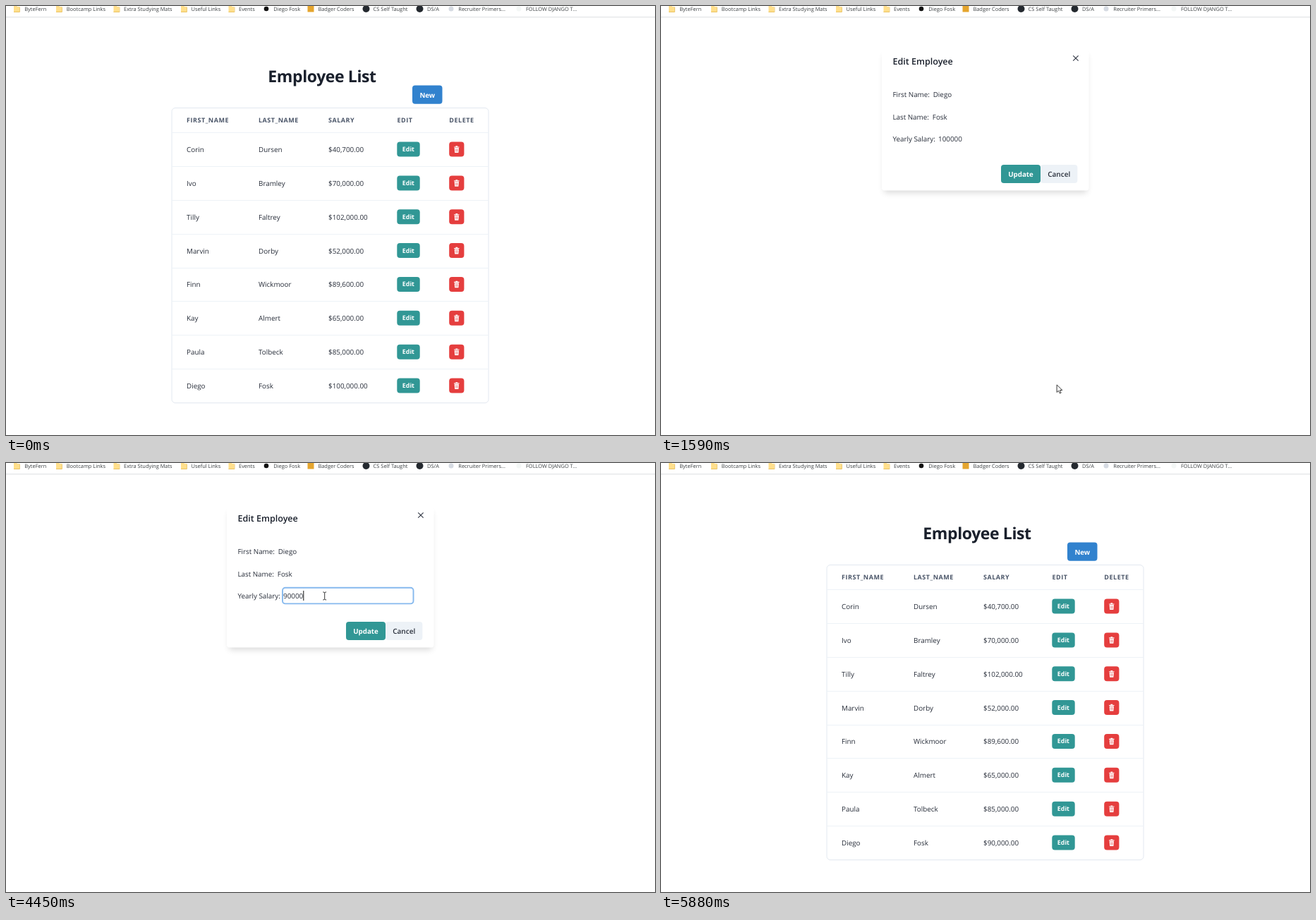
An HTML page for the animation above (6480 ms loop, 920x608 px).

```html
<!DOCTYPE html>
<html lang="en">
<head>
<meta charset="utf-8">
<title>Employee List</title>
<style>
  html, body { margin: 0; width: 100%; height: 100%; overflow: hidden; background: #fff; }
  svg { display: block; width: 920px; height: 608px; }
  text { font: 9.85px "Open Sans", "Noto Sans", sans-serif; fill: #272d39; white-space: pre; text-rendering: geometricPrecision; }
  .bookmark { font-size: 7.45px; fill: #3c4043; }
  .title { font-size: 23px; font-weight: 700; letter-spacing: -.4px; text-anchor: middle; fill: #1a202c; }
  .head { font-size: 9px; font-weight: 700; letter-spacing: .52px; fill: #4a5568; }
  .button { font-size: 9.75px; font-weight: 700; text-anchor: middle; }
  .plain { font-size: 10px; font-weight: 600; }
  .small { font-size: 8.9px; font-weight: 700; text-anchor: middle; }
  .heading { font-size: 12.55px; font-weight: 600; fill: #1a202c; }
  .light { fill: #fff; }
  #modal { transform-origin: 460px 162px; }
  #shadow { filter: blur(4px); }
</style>
</head>
<body>
<svg id="stage" viewBox="0 0 920 608"></svg>
<script>
const LOOP = 6480;
const TEAL = [49, 151, 149], TEAL_DARK = [43, 118, 118];
const DIGIT = 5.66;

const text = (x, y, str, cls = "", id = "") =>
  `<text x="${x}" y="${y}" class="${cls}" id="${id}">${str}</text>`;
const box = (x, y, w, h, fill, r = 4, more = "") =>
  `<rect x="${x}" y="${y}" width="${w}" height="${h}" rx="${r}" fill="${fill}" ${more}/>`;
const dot = (x, r, fill) => `<circle cx="${x}" cy="4" r="${r}" fill="${fill}"/>`;
const line = (d, stroke, width = 1) =>
  `<path d="${d}" fill="none" stroke="${stroke}" stroke-width="${width}"/>`;
const rgb = c => `rgb(${c.map(Math.round)})`;

// Browser bookmark bar
const folder = x =>
  `<path d="M${x}-1h4l1 2h3v8h-8z" fill="#ffdf8c"/>` + line(`M${x} 8.5h8.5v-7`, "#e6bd58", .8);
const bookmarks = [
  [26.3, "ByteFern", folder(11)],
  [85.8, "Bootcamp Links", folder(71)],
  [167, "Extra Studying Mats", folder(152.5)],
  [262.5, "Useful Links", folder(248)],
  [330, "Events", folder(315.5)],
  [379.3, "Diego Fosk", dot(369, 3.3, "#111")],
  [442.4, "Badger Coders", box(427.5, -.5, 9, 9, "#e5a52e", 0)],
  [520.6, "CS Self Taught", dot(510.5, 5, "#24292f")],
  [597, "DS/A", dot(586.5, 5, "#24292f")],
  [641.3, "Recruiter Primers...", dot(631, 3.5, "#d5dae2")],
  [737, "FOLLOW DJANGO T...", dot(727, 3.5, "#f4f7f6")],
];
const bar = bookmarks.map(([x, label, icon]) => icon + text(x, 6.8, label, "bookmark")).join("")
  + line("M0 15.8H920", "#dcdee1");

// Employee table
const people = [
  ["Corin", "Dursen", "$40,700.00"], ["Ivo", "Bramley", "$70,000.00"],
  ["Tilly", "Faltrey", "$102,000.00"], ["Marvin", "Dorby", "$52,000.00"],
  ["Finn", "Wickmoor", "$89,600.00"], ["Kay", "Almert", "$65,000.00"],
  ["Paula", "Tolbeck", "$85,000.00"], ["Diego", "Fosk", "$100,000.00"],
];
const columns = [[256, "FIRST_NAME"], [358, "LAST_NAME"], [457, "SALARY"], [554.5, "EDIT"], [628.3, "DELETE"]];

const trash = y => `<g transform="translate(638.8 ${y})">`
  + line("M-3.7-3.2H3.7M-1.4-4.3H1.4", "#fff", 1.1)
  + `<path d="M-3.1-2.1H3.1L2.6 4.8H-2.6Z" fill="#fff"/>`
  + line("M-1-.8V3.4M1-.8V3.4", "#e53e3e", .7) + `</g>`;

const row = ([first, last, salary], i) => {
  const y = 203.2 + i * 47.84, end = i === people.length - 1;
  return line(`M235 ${Math.round(y - 24) + .5}H684`, "#edf2f7")
    + text(256, y + 3.9, first) + text(358, y + 3.9, last)
    + text(457, y + 3.9, salary, "", end ? "salary" : "")
    + box(554.3, y - 10.6, 32.4, 21, rgb(TEAL), 4, end ? 'id="edit"' : "")
    + text(570.4, y + 2.9, "Edit", "small light")
    + box(628.2, y - 10.6, 21.2, 21, "#e53e3e") + trash(y);
};

const list = text(448, 107.6, "Employee List", "title")
  + box(576, 112.6, 42.5, 26.2, "#3182ce") + text(597.3, 129.8, "New", "button light")
  + box(235, 144.5, 449, 418, "#fff", 5, 'stroke="#e2e8f0"')
  + columns.map(([x, label]) => text(x, 165, label, "head")).join("")
  + people.map(row).join("");

// Edit dialog
const modal = box(316, 69, 288, 196, "#000", 4, 'id="shadow" opacity=".14"')
  + box(313, 61, 293.5, 200.5, "#fff")
  + text(328.4, 83.4, "Edit Employee", "heading")
  + line("M584.2 70.3l7.4 7.4m0-7.4l-7.4 7.4", "#2d3340", 1.1)
  + text(328.4, 129.2, "First Name:") + text(385.7, 129.2, "Diego")
  + text(328.4, 160.6, "Last Name:") + text(384.8, 160.6, "Fosk")
  + text(328.4, 192, "Yearly Salary:")
  + box(392, 176.8, 185.5, 22.6, "#fff", 4, 'id="ring" stroke="#86b9ee" stroke-width="1.9"')
  + box(393, 180.5, 34.3, 15.5, "#3390ff", 0, 'id="selection"')
  + text(393, 192, "100000", "", "amount")
  + box(0, 181, 1, 14, "#111", 0, 'id="caret"')
  + box(482, 225, 56, 26, rgb(TEAL), 4, 'id="update"') + text(510, 242, "Update", "button light")
  + box(538, 225, 52.4, 26, "#edf2f7") + text(564.2, 242, "Cancel", "button plain");

const shape = (id, d) =>
  `<path id="${id}" d="${d}" fill="#fff" stroke="#222" stroke-width=".9" stroke-linejoin="round"/>`;
const pointer = `<g id="pointer">
  <circle id="press" cx="-1" r="8" fill="#f4e420" opacity=".7"/>`
  + shape("arrow", "M0 0V10.6L2.5 8.3 4.2 12.1 6 11.3 4.4 7.6H7.8Z")
  + shape("hand", "M-1.2 1Q0-.8 1.2 1V5.2Q2.4 4.4 3.4 5.4Q4.6 4.8 5.4 6Q7 5.6 7.2 7.2V10.5Q7 12.6 6 14.4H0Q-1 11.8-3.6 8.8Q-3.4 6.8-1.2 8.4Z")
  + shape("beam", "M-2.4-5.3Q0-5.3 0-4Q0-5.3 2.4-5.3M0-4V4.5M-2.4 5.8Q0 5.8 0 4.5Q0 5.8 2.4 5.8") + `</g>`;

const group = (id, body) => `<g id="${id}">${body}</g>`;
document.getElementById("stage").innerHTML =
  group("list", list) + group("modal", modal) + bar + pointer;

const el = {};
for (const node of document.querySelectorAll("[id]")) if (node.id) el[node.id] = node;
el.beam.setAttribute("fill", "none");

// Timing tables, in ms
const path = [
  [320, 786, 606], [430, 722, 578], [560, 590, 557], [680, 506, 553], [810, 540, 552], [930, 568.3, 541.8],
  [1500, 568.3, 541.8], [1590, 561.3, 537], [1620, 547, 528], [1800, 500, 400], [2050, 458, 235], [2280, 451.7, 188.2],
  [4910, 451.7, 188.2], [5150, 497, 223], [5250, 501.5, 225.5], [5380, 501.5, 225.5], [5535, 568, 345], [5880, 852, 612],
];
const typed = [[0, "100000"], [3040, "9"], [3310, "90"], [3580, "900"], [4250, "9000"], [4450, "90000"]];
const presses = [[1120, 1240], [2350, 2430], [5290, 5400]];

const within = (t, a, b) => t >= a && t < b;
const ramp = (t, a, b) => {
  const k = Math.min(1, Math.max(0, (t - a) / (b - a)));
  return k * k * (3 - 2 * k);
};
const shade = k => rgb(TEAL.map((c, i) => c + (TEAL_DARK[i] - c) * k));
const show = (node, on) => { node.style.display = on ? "" : "none"; };

// Velocity at a path point; zero beside a rest
function slope(i, axis) {
  const p = path[i], a = path[i - 1] || p, b = path[i + 1] || p;
  const rests = q => q !== p && q[1] === p[1] && q[2] === p[2];
  return rests(a) || rests(b) ? 0 : (b[axis] - a[axis]) / (b[0] - a[0]);
}

function position(t) {
  let i = path.findIndex(p => p[0] > t) - 1;
  i = i < 0 ? (t < path[0][0] ? 0 : path.length - 2) : i;
  const p = path[i], q = path[i + 1], d = q[0] - p[0], k = Math.min(1, Math.max(0, (t - p[0]) / d));
  return [1, 2].map(axis =>
    p[axis] * (1 + 2 * k) * (1 - k) ** 2 + q[axis] * k * k * (3 - 2 * k)
    + d * (slope(i, axis) * k * (1 - k) ** 2 - slope(i + 1, axis) * k * k * (1 - k)));
}

function render(t) {
  const open = ramp(t, 1240, 1460) - ramp(t, 5325, 5480);
  el.list.style.opacity = 1 - open;
  el.modal.style.opacity = open;
  el.modal.style.transform = open < 1 ? `scale(${.95 + .05 * open})` : "none";
  el.salary.textContent = t < 5300 ? "$100,000.00" : "$90,000.00";
  el.edit.setAttribute("fill", shade(ramp(t, 860, 1060) - ramp(t, 1260, 1400)));
  el.update.setAttribute("fill", shade(ramp(t, 5150, 5310)));

  const focus = within(t, 2350, 5290), selected = within(t, 2380, 3040);
  const [since, value] = typed.filter(k => k[0] <= t).pop();
  el.ring.style.opacity = focus ? ramp(t, 2330, 2480) : 0;
  show(el.selection, selected);
  el.amount.textContent = value;
  el.amount.style.fill = selected ? "#fff" : "";
  show(el.caret, focus && t >= 3040 && (t - since) % 1020 < 510);
  el.caret.setAttribute("x", 393 + value.length * DIGIT);

  const [x, y] = position(t);
  const hand = within(t, 910, 1260) || within(t, 5140, 5400);
  const beam = within(t, 1700, 5100) && y < 200;
  show(el.pointer, within(t, 320, 5880));
  el.pointer.setAttribute("transform", `translate(${x.toFixed(2)} ${y.toFixed(2)})`);
  show(el.hand, hand);
  show(el.beam, beam);
  show(el.arrow, !hand && !beam);
  show(el.press, presses.some(([a, b]) => within(t, a, b)));
}

const start = performance.now();
function tick() {
  render((performance.now() - start) % LOOP);
  requestAnimationFrame(tick);
}
tick();
</script>
</body>
</html>
```
